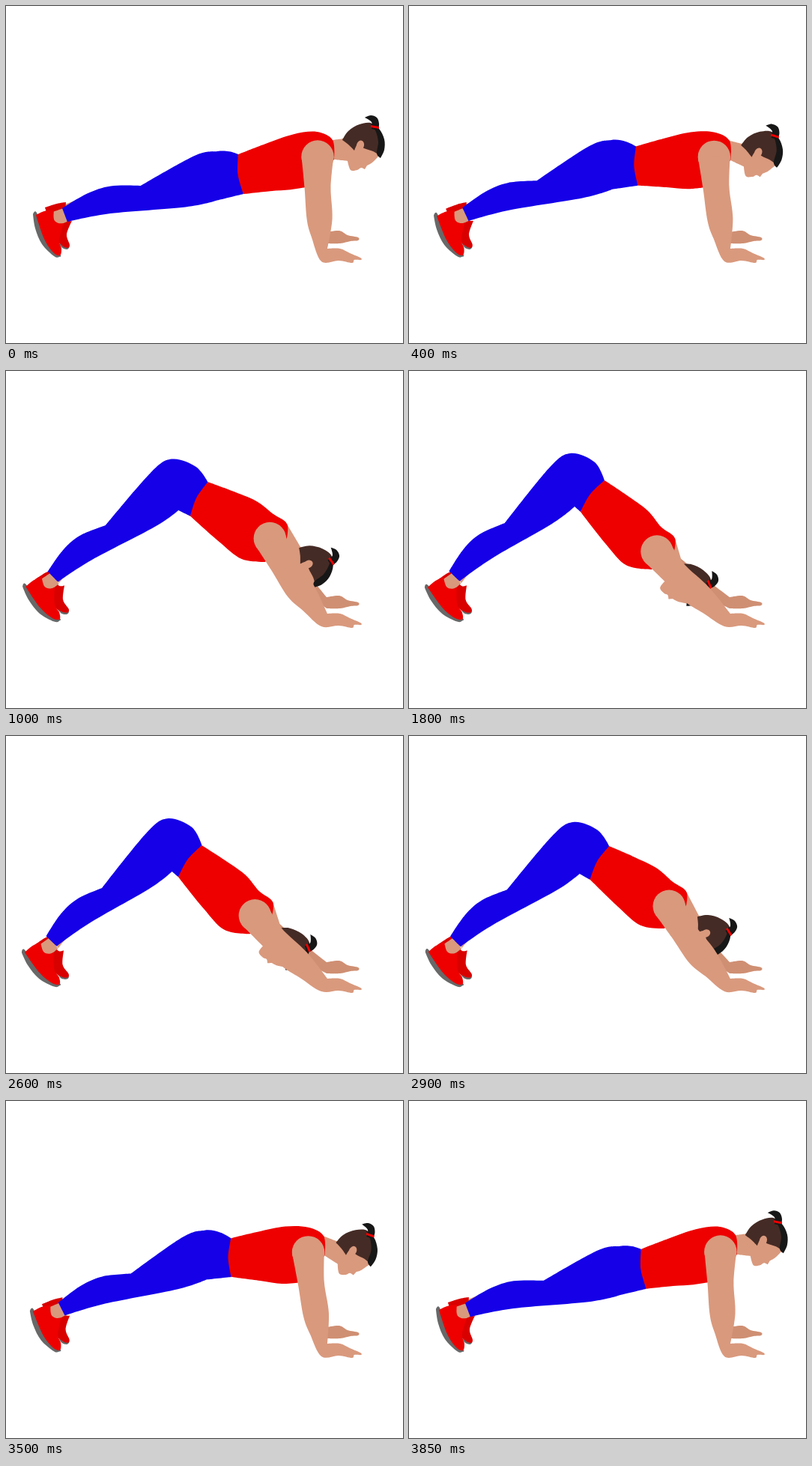
Animation, 530 px wide and 450 px high, one loop 3.9 s. Source, as an HTML page with a canvas:

```html
<!DOCTYPE html>
<html lang="en">
<head>
<meta charset="utf-8">
<title>Plank to downward dog</title>
<style>
  html, body { margin: 0; width: 100%; height: 100%; overflow: hidden; background: #fff; }
  canvas { display: block; }
</style>
</head>
<body>
<canvas id="stage" width="530" height="450"></canvas>
<script>
const ctx = document.getElementById('stage').getContext('2d');
const LOOP = 3900, STEP = 50, MIRROR = 3960, START = 20, END = 1550;
const RED = '#ee0000', DARK_RED = '#d90000', BLUE = '#1500e8', SKIN = '#d9997d',
      SHADE = '#cf8f73', BROWN = '#452b25', BLACK = '#171717', SOLE = '#686868';

// Plank place, dog place, and how far x and y run ahead (+) or behind (-) on the way.
const joints = {
  ankle:    { from: [78.5, 279], to: [60.5, 274], lead: [.7, .7] },
  knee:     { from: [180, 240],  to: [128, 203],  lead: [.85, .85] },
  hip:      { from: [282, 194],  to: [215, 110],  lead: [.85, .85] },
  loin:     { from: [310, 198],  to: [261, 146],  lead: [.4, 1.1] },
  belly:    { from: [317, 251],  to: [229, 188],  lead: [.3, .85] },
  crotch:   { from: [280, 260],  to: [221, 181],  lead: [.5, 1] },
  shoulder: { from: [416, 201],  to: [331, 241],  lead: [0, -1] },
  chest:    { from: [400, 242],  to: [324, 265],  lead: [-.2, -1] },
  elbow:    { from: [416, 283],  to: [375, 295],  lead: [-.25, 0] },
  ear:      { from: [473, 186],  to: [370, 282],  lead: [-.4, 0] }
};
const EAR = joints.ear.from, WRIST = [424, 332], BACK_WRIST = [422, 309];
const HAND = pairs([429,324, 446,324, 459,330, 473,336, 474,339, 465,339, 462,343, 444,340, 421,341]);
const BACK_HAND = pairs([428,302, 445,300, 456,306, 470,309, 470,313, 460,314, 446,317, 428,317]);

function pairs(list) {
  const out = [];
  for (let i = 0; i < list.length; i += 2) out.push([list[i], list[i + 1]]);
  return out;
}

const mix = (a, b, p, lead = 0) => a + (b - a) * (p + lead * p * (1 - p));
const smoother = s => s * s * s * (s * (6 * s - 15) + 10);

function turn([x, y], deg) {
  const a = deg * Math.PI / 180, c = Math.cos(a), s = Math.sin(a);
  return [x * c - y * s, x * s + y * c];
}

const add = (a, b) => [a[0] + b[0], a[1] + b[1]];

// Point at share u of the line a-b, v pixels to its left.
function beside(a, b, u, v) {
  const dx = b[0] - a[0], dy = b[1] - a[1], len = Math.hypot(dx, dy);
  return [a[0] + dx * u + dy / len * v, a[1] + dy * u - dx / len * v];
}

// Closed smooth outline; indexes in corners stay sharp.
function shape(color, pts, corners = []) {
  const n = pts.length, at = i => pts[(i + n) % n];
  const handle = (i, sign) => {
    const p = at(i);
    if (corners.includes((i + n) % n)) return p;
    const a = at(i - 1), b = at(i + 1);
    return [p[0] + sign * (b[0] - a[0]) / 6, p[1] + sign * (b[1] - a[1]) / 6];
  };
  ctx.beginPath();
  ctx.moveTo(...pts[0]);
  for (let i = 0; i < n; i++) ctx.bezierCurveTo(...handle(i, 1), ...handle(i + 1, -1), ...at(i + 1));
  ctx.fillStyle = color;
  ctx.fill();
}

function polygon(color, pts) {
  shape(color, pts, pts.map((_, i) => i));
}

function oval(color, x, y, rx, ry = rx, tilt = 0) {
  ctx.beginPath();
  ctx.ellipse(x, y, rx, ry, tilt, 0, Math.PI * 2);
  ctx.fillStyle = color;
  ctx.fill();
}

function turned(place, deg, pivot, paint) {
  ctx.save();
  ctx.translate(...place);
  ctx.rotate(deg * Math.PI / 180);
  ctx.translate(-pivot[0], -pivot[1]);
  paint();
  ctx.restore();
}

function backShoe() {
  polygon(SKIN, pairs([76,266, 94,259, 96,272, 82,282]));
  shape(SOLE, pairs([70,313, 76,320, 84,322, 81,325, 74,322]));
  shape(DARK_RED, pairs([52,269, 68,264, 80,262, 80,284, 88,287, 81,305, 85,319, 82,323, 74,319, 64,305]),
    [0, 2, 4]);
}

function frontShoe() {
  shape(SOLE, pairs([36,278, 41,276, 52,308, 72,331, 71,335, 64,334, 48,318, 39,297]), [0]);
  polygon(SKIN, pairs([62,275, 77,270, 84,287, 72,292, 64,288]));
  shape(RED, pairs([40,279, 51,274, 64,272, 64,285, 70,290, 77,290, 71,312, 74,324, 72,333, 63,329, 51,311]),
    [0, 2, 5]);
}

function head() {
  shape(SKIN, pairs([449,177, 470,172, 492,180, 498,200, 489,209, 482,213, 479,218, 474,216,
                     469,219, 460,219, 456,207]), [0, 3, 5, 6, 10]);
  shape(BROWN, pairs([449,179, 457,167, 472,158, 489,157, 500,175, 500,200, 490,194, 478,190,
                      470,184, 465,193, 457,185]), [0, 5, 9]);
  shape(BLACK, pairs([486,157, 498,164, 505,178, 505,192, 500,203, 495,197, 497,181, 493,166]), [0, 4]);
  shape(BLACK, pairs([488,164, 488,155, 479,149, 487,146, 495,149, 498,157, 497,166]), [0, 2, 6]);
  polygon(RED, pairs([487,159, 498,161, 498,164, 487,162]));
  oval(SKIN, ...EAR, 5, 6.5, .3);
}

function draw(p) {
  const j = {};
  for (const [name, { from, to, lead }] of Object.entries(joints)) {
    j[name] = from.map((v, i) => mix(v, to[i], p, lead[i]));
  }
  const { ankle, knee, hip, loin, belly, crotch, shoulder, chest, elbow, ear } = j;
  const tilt = mix(0, 57, p, .15), foot = mix(0, -17, p, .85);
  const onHead = (x, y) => add(ear, turn([x, y], tilt));
  const strap = pairs([-1,-33, 20,-22, 22,4]).map(q => add(shoulder, turn(q, 12 * p)));
  const calf = beside(ankle, knee, .53, -20);

  ctx.fillStyle = '#fff';
  ctx.fillRect(0, 0, 530, 450);

  turned([80, 323], foot, [80, 323], backShoe);
  turned([66, 334], foot, [66, 334], frontShoe);

  shape(SHADE, [
    beside(shoulder, BACK_WRIST, 0, 14), beside(shoulder, BACK_WRIST, .5, 10),
    ...BACK_HAND, beside(shoulder, BACK_WRIST, .5, -10)
  ], [0, 2, 9]);

  polygon(SKIN, [strap[1], onHead(-22, -9), onHead(0, 0), onHead(-16, 21), strap[2], strap[0]]);
  turned(ear, tilt, EAR, head);

  shape(RED, [
    loin, beside(loin, strap[0], .35, 3.5), beside(loin, strap[0], .71, 5.5),
    ...strap, chest,
    beside(chest, belly, .245, 1 + 16 * p), beside(chest, belly, .57, 12 * p),
    belly, beside(loin, belly, .5, -7)
  ], [0, 5, 6, 9]);

  shape(BLUE, [
    beside(ankle, knee, 0, 9.7), beside(ankle, knee, .35, 16), beside(ankle, knee, .655, 14), knee,
    beside(knee, hip, .73, 7), hip, beside(hip, loin, .56, 2 + 9 * p), loin,
    beside(loin, belly, .5, -4), belly, crotch,
    beside(crotch, calf, .29, 3.5), calf, beside(ankle, knee, 0, -9.8)
  ], [0, 3, 7, 9, 10, 13]);

  oval(SKIN, ...shoulder, 21.7);
  shape(SKIN, [
    beside(shoulder, elbow, 0, 21.5), beside(shoulder, elbow, .5, 17.5), beside(shoulder, WRIST, .64, 14.5),
    ...HAND,
    beside(elbow, WRIST, .5, -12), beside(elbow, WRIST, 0, -14.5),
    beside(shoulder, elbow, .5, -17.5), beside(shoulder, elbow, 0, -21.5)
  ], [0, 3, 15]);
}

function tick() {
  const t = Math.floor(performance.now() % LOOP / STEP) * STEP;
  const s = (Math.min(t, MIRROR - t) - START) / (END - START);
  draw(smoother(Math.min(1, Math.max(0, s))));
  requestAnimationFrame(tick);
}
tick();
</script>
</body>
</html>
```
